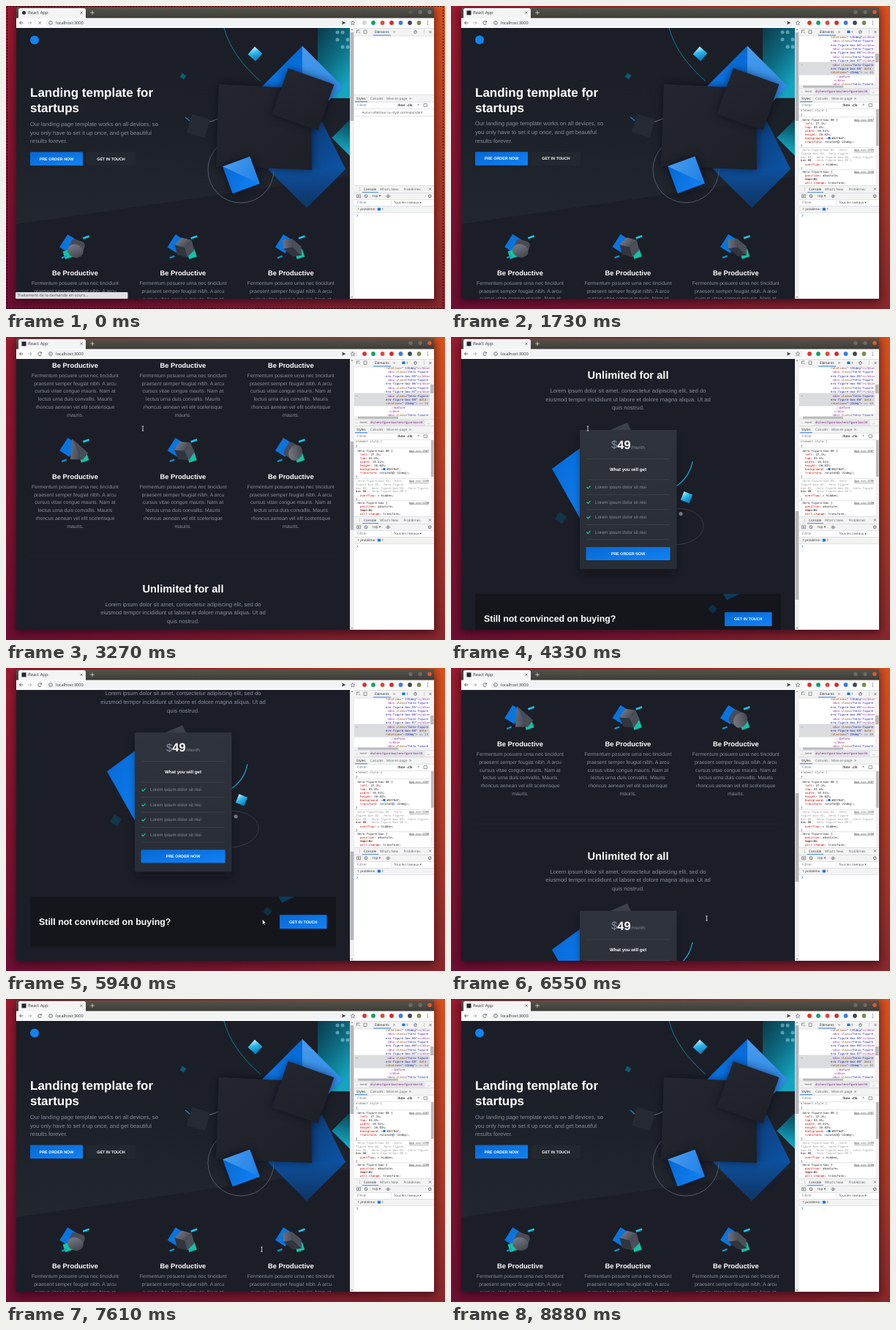
Write an HTML page that moves like this. It is 600 px wide and 414 px high and loops after 9.06 s.

```html
<!DOCTYPE html>
<html lang="fr">
<head>
<meta charset="utf-8">
<title>React App</title>
<style>
html, body { margin: 0; width: 100%; height: 100%; overflow: hidden; background: #620d3c; }
svg { display: block; width: 600px; height: 414px; }
text { white-space: pre; text-rendering: geometricPrecision; }
.site { font-family: "Liberation Sans", Arial, sans-serif; }
.ui { font-family: "Open Sans", "Noto Sans", sans-serif; }
.code { font-family: "DejaVu Sans Mono", monospace; }
.b { font-weight: 700; }
.m { text-anchor: middle; }
.e { text-anchor: end; }
</style>
</head>
<body>
<svg id="stage" viewBox="0 0 600 414"></svg>
<script>
const LOOP = 9060, LOADED = 900;
const esc = s => s.replace(/&/g, '&amp;').replace(/</g, '&lt;');
const repeat = (n, draw) => Array.from({ length: n }, (_, i) => draw(i)).join('');
// y is the optical middle of the line
const text = (x, y, size, str, fill, cls = 'ui') =>
  `<text x="${x}" y="${y + size * .35}" font-size="${size}" fill="${fill}" class="${cls}">${esc(str)}</text>`;
const lines = (x, y, step, size, rows, fill, cls) => repeat(rows.length, i => text(x, y + i * step, size, rows[i], fill, cls));
const rect = (x, y, w, h, fill, more = '') =>
  `<rect x="${x}" y="${y}" width="${w}" height="${h}" fill="${fill}" ${more}/>`;
const poly = (points, fill, more = '') => `<polygon points="${points}" fill="${fill}" ${more}/>`;
const circle = (x, y, r, fill, more = '') => `<circle cx="${x}" cy="${y}" r="${r}" fill="${fill}" ${more}/>`;
const line = (d, stroke, width = .8) => `<path d="${d}" fill="none" stroke="${stroke}" stroke-width="${width}"/>`;
const ring = (x, y, r, stroke, width = .7) => circle(x, y, r, 'none', `stroke="${stroke}" stroke-width="${width}"`);
const place = (x, y, angle, body) => `<g transform="translate(${x} ${y}) rotate(${angle})">${body}</g>`;
const square = (x, y, size, angle, fill, ratio = 1) =>
  place(x, y, angle, rect(-size / 2, -size * ratio / 2, size, size * ratio, fill));
const sheen = (x, y, size, angle) =>
  place(x, y, angle, `<path d="M${-size / 2} ${-size / 2}h${size}v${size}z" fill="url(#sheen)" opacity=".75"/>`);
const shadow = body => `<g filter="url(#soft)" opacity=".55">${body}</g>`;
const group = (id, body, more = '') => `<g id="${id}" ${more}>${body}</g>`;
const grad = (id, [x2, y2], ...colors) =>
  `<linearGradient id="${id}" x1="0" y1="0" x2="${x2}" y2="${y2}">` +
  colors.map((c, i) => `<stop offset="${i / (colors.length - 1)}" stop-color="${c}"/>`).join('') + '</linearGradient>';
const clip = (id, x, y, w, h) => `<clipPath id="${id}">${rect(x, y, w, h, '#000')}</clipPath>`;

const defs = '<defs>' +
  grad('wall', [1, 0], '#9c1a30', '#b9302a', '#dc5220') +
  grad('dusk', [0, 1], '#4a063600', '#4a063690') +
  grad('frame', [0, 1], '#55534b', '#3d3c37') +
  grad('slope', [0, 1], '#1b1e26', '#1c2028', '#22262e') +
  grad('blue', [1, 1], '#0568d4', '#1282f5') +
  grad('deep', [1, 1], '#0c5fc0', '#0d4f9c', '#0f3564') +
  grad('flank', [1, 1], '#0d3c78', '#0b55a8') +
  grad('sheen', [1, 1], '#62acf2', '#1c7fe6') +
  grad('teal', [.6, 1], '#0b3a4a', '#0c6a80', '#15a5c0') +
  grad('ice', [1, .6], '#c9f3ff', '#2bb6ea', '#0b86c6') +
  grad('slab', [1, 1], '#23262e', '#1d2027') +
  grad('steel', [1, 1], '#80838c', '#3a3d46') +
  grad('card', [0, 1], '#2f333c', '#282c34') +
  '<filter id="soft" x="-30%" y="-30%" width="160%" height="160%"><feGaussianBlur stdDeviation="6"/></filter>' +
  clip('page', 14, 30, 456, 370) + clip('tree', 476, 41, 103, 68) + clip('rules', 476, 140, 103, 104.5) +
  '</defs>';

/* landing page, laid out at scroll 0 */
const WHITE = '#fff', MUTED = '#858d9a', BLACK = '#0c0e13';
const button = (x, y, w, h, label, fill = 'url(#blue)') =>
  rect(x, y, w, h, fill, 'rx=".8"') + text(x + w / 2, y + h / 2, 5.4, label, WHITE, 'site b m');

function hero() {
  const slab = fill => poly('291,107 417,113 418,224 287,219', fill);
  const block = fill => square(406, 127.5, 66.5, 19.5, fill);
  const box = fill => square(321.5, 231, 39.5, -20, fill);
  return poly('14,30 470,30 470,232 14,298', 'url(#slope)') +
    circle(39, 46.5, 6, '#0f84f2') +
    line('M298 30Q308 68 348 103', '#0c7f9c', 1) +
    rect(426, 30, 44, 96, 'url(#teal)') +
    repeat(6, i => circle(453 + i % 3 * 7, 36 + (i >> 1) * 10, 2.5, '#bfeaf2', 'opacity=".45"')) +
    square(475, 180, 42, 45, 'url(#teal)') +
    square(405, 110, 78, 45, 'url(#blue)') + sheen(405, 110, 78, 45) +
    square(411, 223, 75, 45, 'url(#deep)') + poly('417,165 432,158 464,223 417,223', 'url(#flank)') +
    ring(321, 224, 45, '#646a76', .8) +
    line('M245 152Q249 155 251 157', '#1689d8', 1.2) + line('M276 159Q284 157 292 153', '#747a85', 1) +
    square(263, 164, 26, 17, '#262a32') + square(242, 96, 6.5, 35, '#0e5a72') +
    shadow(slab(BLACK)) + slab('url(#slab)') + shadow(block(BLACK)) + block('url(#slab)') +
    square(340.5, 65.5, 14, 42, 'url(#ice)') +
    shadow(box(BLACK)) + box('url(#blue)') + sheen(321.5, 231, 39.5, -20) +
    lines(33, 118, 21, 17, ['Landing template for', 'startups'], WHITE, 'site b') +
    lines(33, 161, 11.8, 7.74, ['Our landing page template works on all devices, so',
      'you only have to set it up once, and get beautiful', 'results forever.'], MUTED, 'site') +
    button(33, 199.5, 72, 18.5, 'PRE ORDER NOW') + button(110, 199.5, 67, 18.5, 'GET IN TOUCH', '#23272f');
}

const hexPoint = (k, r) => [Math.sin(k * Math.PI / 3) * r, -Math.cos(k * Math.PI / 3) * r].map(v => v.toFixed(1)).join();
const cube = r => ['url(#steel)', '#4b4f59', '#32353e'].map((fill, i) =>
  poly(['0,0', ...[5, 6, 7].map(k => hexPoint(k + i * 2, r))].join(' '), fill)).join('');
const solids = {
  cylinder: rect(-10, -10, 20, 17, '#484c56', 'rx="5"') + `<ellipse cy="5" rx="11" ry="9" fill="url(#steel)"/>`,
  cube: cube(14),
  prism: `<g transform="scale(.75 1.2)">${cube(14)}</g>`,
  cone: poly('0,-18 -12,8 4,14', 'url(#steel)') + poly('0,-18 4,14 14,8', '#484c56')
};
const icon = (kind, turn) => square(-9, -5, 16, 32, '#0a74de', 1.3) + square(turn < 0 ? 12 : -10, 9, 11, -18, '#12c3a4') +
  square(15, -14, 9, -20, '#18c8ec', .3) + square(-15, 13, 7, -20, '#0c9fd0', .3) + place(2, 0, turn, solids[kind]);
const tiles = [['cylinder', 20], ['cube', -15], ['prism', -50], ['cone', -20], ['cube', -25], ['cylinder', -60]];
const blurb = ['Fermentum posuere urna nec tincidunt', 'praesent semper feugiat nibh. A arcu', 'cursus vitae congue mauris. Nam at',
  'lectus urna duis convallis. Mauris', 'rhoncus aenean vel elit scelerisque', 'mauris.'];
const features = () => tiles.map((tile, i) =>
  place(94.5 + i % 3 * 147.4, 330 + (i > 2) * 152, 0, icon(...tile) +
    text(0, 35, 9.35, 'Be Productive', WHITE, 'site b m') + lines(0, 48.7, 10.8, 6.93, blurb, MUTED, 'site m'))).join('');

function pricing() {
  const rule = y => rect(185, y, 114, .6, '#454a54');
  const item = i => {
    const y = 823 + i * 20.5;
    return line(`M185.5 ${y}l1.8 1.8 3.2-3.4`, '#10cfa8', 1.2) +
      text(197, y, 6.17, 'Lorem ipsum dolor sit nisi', MUTED, 'site') + rule(y + 10);
  };
  return rect(33, 626, 418, .5, '#262a32') +
    text(242, 670, 14.7, 'Unlimited for all', WHITE, 'site b m') +
    lines(242, 691.3, 11.7, 7.72, ['Lorem ipsum dolor sit amet, consectetur adipiscing elit, sed do',
      'eiusmod tempor incididunt ut labore et dolore magna aliqua. Ut ad', 'quis nostrud.'], MUTED, 'site m') +
    square(150, 865, 12, 35, '#123646') +
    poly('138,798 190,760 190,890', 'url(#blue)') + poly('190,757 241,735 252,757', '#3d424c') +
    line('M330 788Q326 810 306 823', '#1ba8d8', 1.2) + square(322, 837, 12.5, 22, 'url(#ice)') +
    line('M306 852C358 852 358 899 306 902', '#3f444e') + circle(314, 859.5, 2.6, '#767c87') +
    shadow(rect(178, 752, 128, 190, BLACK)) + rect(176, 745, 132.5, 190, 'url(#card)') +
    text(219, 765, 15, '$', '#8a92a2', 'site') + text(227.3, 765, 16.4, '49', WHITE, 'site b') +
    text(246, 768.5, 6.2, '/month', MUTED, 'site') + rule(784) +
    text(242, 798.5, 6.15, 'What you will get', WHITE, 'site b m') + rule(812.5) +
    repeat(4, item) + button(184.5, 905, 115, 18, 'PRE ORDER NOW') +
    rect(33, 969, 418, 68.5, '#14161c') + poly('372,969 395,969 377,977.5', '#0c3a5c') +
    square(357.5, 989.5, 9, 40, '#0d3046') +
    text(45, 1003, 12.4, 'Still not convinced on buying?', WHITE, 'site b') + button(374, 994, 64.5, 19, 'GET IN TOUCH');
}

/* browser frame */
const INK = '#55585c', HAIR = '#cfd2d6';
const stroke = (d, w = .9) => line(d, INK, w);
const cross = (x, y, r = 1.6) => stroke(`M${x - r} ${y - r}l${2 * r} ${2 * r}m0-${2 * r}l-${2 * r} ${2 * r}`, .7);
const extensions = ['#12a06a', '#e2483c', '#d42a2a', '#3c7de0', '#44474b', '#7a8a55'];
const browser = rect(14, 2, 571, 15, 'url(#frame)', 'rx="2"') + rect(17, 3, 92, 16, '#f4f4f5', 'rx="2.5"') +
  text(30, 9.3, 5.9, 'React App', '#33363a') + cross(103, 9.2) +
  line('M118 6.3v5.6m-2.8-2.8h5.6', '#d8d7d3') +
  rect(14, 16.5, 571, 13.5, '#fdfdfd') + rect(54, 17.8, 427, 10.8, '#f1f3f4', 'rx="5.4"') +
  stroke('M23.5 23h-5m2.3-2.3l-2.3 2.3 2.3 2.3') + line('M30 23h5m-2.3-2.3l2.3 2.3-2.3 2.3', '#a5a8ab') +
  ring(61, 23, 2.4, INK) + stroke('M61 22.6v1.6m0-2.7v.5', .6) +
  text(68, 23, 5.6, 'localhost:3000', '#303236') +
  poly('459,20.5 464.5,23 459,25.5 460,23', '#3d4044') +
  stroke('M474 20.2l.9 1.9 2 .2-1.5 1.4.4 2-1.8-1-1.8 1 .4-2-1.5-1.4 2-.2z', .6) +
  repeat(extensions.length, i => circle(502 + i * 12.5, 23, 2.9, extensions[i])) +
  repeat(3, i => circle(576.5, 20.8 + i * 2.2, .6, INK));

/* developer tools */
const gear = (x, y) => circle(x, y, 1.7, 'none', 'stroke="#4c4f53" stroke-width="1.1" stroke-dasharray="1 .35"');
const tab = (x, y, s, width) => text(x, y, 4.6, s, width ? '#222' : '#606468') +
  (width ? rect(x - 2, y + 4, width, .9, '#1a73e8') : '');
const badge = (x, y) => rect(x - 2.2, y - 2, 4.2, 3.6, '#1a73e8', 'rx=".6"') + text(x + 3.5, y, 4.6, '1', '#333');
const hr = y => rect(476, y, 109, .6, HAIR);
const bar = (y, h) => rect(476, y, 109, h, '#f3f3f3') + hr(y) + hr(y + h);
const tools = rect(476, 30, 109, 370, '#fff') +
  bar(30, 10.7) + stroke('M479.5 37v-4h4m-2 2l2.4 2.4', .7) + stroke('M489 33h4v4.5h-4z', .6) +
  tab(504, 35.5, 'Éléments', 24) + text(529, 35, 6, '»', INK) + gear(559.5, 35.5) + text(568.5, 35.3, 6, '⋮', INK) + cross(580, 35.5) +
  bar(121.3, 9.7) + tab(479, 126.3, 'Styles', 17) + tab(498, 126.3, 'Calculés') + tab(520, 126.3, 'Mise en page') + text(551, 126, 6, '»', INK) +
  text(480, 135.4, 4.8, 'Filtrer', '#777') + text(535, 135.4, 4.8, ':hov  .cls', '#333', 'ui b') +
  text(562, 135.2, 6, '+', INK) + stroke('M571 133.6h4.5v4h-4.5z', .6) + hr(140) +
  bar(245, 10) + text(480.5, 250, 6, '⋮', INK) + tab(489, 250.3, 'Console', 22) +
  tab(511, 250.3, "What's New") + tab(543.5, 250.3, 'Problèmes') + cross(579.5, 250) +
  bar(255, 9.5) + stroke('M479.5 257.8h5v4h-5zm2 1l1.4 1-1.4 1z', .6) + ring(492, 259.7, 2, INK) + stroke('M490.6 258.3l2.8 2.8', .6) +
  text(501, 259.8, 4.8, 'top ▾', '#444') + stroke('M519.5 259.8q2.7-3.6 5.4 0q-2.7 3.6-5.4 0z', .7) + circle(522.2, 259.8, .9, INK) +
  gear(579.3, 259.7) + text(480, 268.7, 4.8, 'Filtrer', '#777') + rect(526, 265.5, .5, 7, HAIR) +
  text(530, 268.7, 4.5, 'Tous les niveaux ▾', '#444') +
  bar(273, 9) + text(480.5, 277.7, 4.4, '1 problème :', '#333') + badge(510, 277.8) +
  line('M479.3 284.6l1.5 1.6-1.5 1.6', '#2b78e4', .8);

const code = (x, y, ...parts) => `<text x="${x}" y="${y + 1.4}" font-size="4" class="code">` +
  parts.map(([s, c]) => `<tspan fill="${c}">${esc(s)}</tspan>`).join('') + '</text>';
const TAG = '#881280', VAL = '#1a1aa6', ATT = '#994500', RED = '#c80000', DARK = '#222', PALE = '#999';
function tree() {
  const open = [[' <div ', TAG], ['class', ATT], ['="hero-figure-box h', VAL]];
  const rotation = (deg, ...rest) => [['rotation', ATT], [`="${deg}deg"`, VAL], ...rest];
  const sibling = n => [open, [[`ero-figure-box-${n}"`, VAL], ['></div>', TAG]]];
  const rows = [rotation(-135, ['></div>', TAG]), ...['05', '06', '07'].flatMap(sibling),
    open, [['ero-figure-box-08" ', VAL], ['data-', ATT]], rotation(-22, ['> == $0', '#777']),
    [['   ::before', TAG]], [['  </div>', TAG]], open];
  return rect(476, 76.5, 103, 18, '#dadce0') + text(477.5, 79, 5, '…', INK) +
    rows.map((row, i) => code(519, 42.5 + i * 5.38, ...row)).join('');
}
function rules() {
  const prop = (y, name, value) => code(484, y, [name, RED], [': ' + value + ';', DARK]);
  const head = (y, s, n) => code(478, y, [s, DARK]) +
    `<text x="578" y="${y + 1.2}" font-size="3.75" class="code e" fill="#333" text-decoration="underline">App.css:${n}</text>`;
  const box = ['left: 27.1%', 'top: 81.6%', 'width: 19.51%', 'height: 26.02%', 'background: ▸  #0270d7', 'transform: rotateZ( -22deg)'];
  const shared = ['.hero-figure-box-01, .hero-', 'figure-box-02, .hero-figure-', 'box-03, .hero-figure-box-04, .hero-figure-'];
  return code(478, 143, ['element.style {', '#666']) + code(478, 148.5, ['}', DARK]) + hr(151.5) +
    head(155.5, '.hero-figure-box-08 {', 1387) + repeat(box.length, i => prop(160.7 + i * 5, ...box[i].split(': '))) +
    rect(515.5, 179, 3, 3, '#0270d7') + ring(529.5, 185.7, 1.4, INK) + code(478, 190.5, ['}', DARK]) + hr(193) +
    head(197, '', 1195) + repeat(3, i => code(478, 197 + i * 4.6, [shared[i], PALE])) +
    code(478, 211, ['box-08', DARK], [', .hero-figure-box-09 {', PALE]) +
    prop(216.5, 'overflow', '▸ hidden') + code(478, 221.5, ['}', DARK]) + hr(223.5) + head(226.5, '.hero-figure-box {', 1190) +
    prop(231.5, 'position', 'absolute') + prop(236.5, 'top', '0') + line('M484 236.5h17', '#333', .5) + prop(241.5, 'will-change', 'transform');
}

const controls = (...fills) => repeat(3, i => circle(553 + i * 13, 8.2, 2.7, fills[i]));
const busy = cross(46.3, 23, 2.1) + circle(24.5, 9.3, 2.5, '#2a2c30') + circle(490, 23, 2.9, '#d3d6d8') +
  controls('#5b5953', '#6b6a65', '#77756f') +
  text(528, 145, 4.5, 'Aucun sélecteur ou style correspondant', '#555', 'ui m') + hr(150) +
  rect(13, 391, 153.5, 9, '#dee0e2', 'rx="1"') + text(15.5, 395.2, 5.6, 'Traitement de la demande en cours…', '#5b5e62');
const ready = stroke('M48.2 21.6a2.4 2.4 0 1 0 .3 2.2m0-3.4v1.7h-1.8') +
  rect(21.5, 6.3, 6, 6, '#23272f') + circle(490, 23, 2.9, '#d9362b') +
  controls('#6d6b64', '#6d6b64', '#e8582b') + badge(543.5, 35.5) +
  group('treePane', tree(), 'clip-path="url(#tree)"') + rect(579.5, 41, 5.5, 68, '#f1f1f1') + rect(580, 65, 4.5, 12, '#b9bbbd') +
  rect(476, 108, 109, 4.5, '#f1f1f1') + rect(481, 108.7, 55, 3, '#b9bbbd') + bar(112.5, 9) +
  text(478, 117, 4.2, '…  ment', '#555') + rect(496.5, 113, 76, 8, '#e2e4e7') +
  text(498, 117, 4, 'div.hero-figure-box.hero-figure-box-08', TAG) + text(576, 117, 4.4, '…', '#555') +
  group('rulePane', rules(), 'clip-path="url(#rules)"') + rect(580.5, 140.5, 4.5, 104, '#f1f1f1') + rect(581, 141, 3.5, 50, '#b9bbbd');

const PAGE = 1095, VIEW = 370, TRACK = 358, THUMB = TRACK * VIEW / PAGE;
document.getElementById('stage').innerHTML = defs +
  rect(0, 0, 600, 414, 'url(#wall)') + rect(0, 0, 600, 414, 'url(#dusk)') + shadow(rect(12, 3, 575, 402, '#14040c')) +
  group('view', rect(14, 30, 456, 370, '#1b1e27') + group('content', hero() + features() + pricing()), 'clip-path="url(#page)"') +
  browser + rect(470, 30, 6, 370, '#f1f1f1') + poly('471.5,33 474.5,33 473,31.3', '#888') + poly('471.5,397 474.5,397 473,398.8', '#888') +
  rect(470.7, 36, 4.6, THUMB, '#b4b6b9', 'id="thumb"') + tools + group('busy', busy) + group('ready', ready) +
  rect(1.5, .5, 596, 413, 'none', 'id="marquee" stroke="#120610" stroke-dasharray="2 2"') +
  group('beam', line('M-1.3-3h2.6M0-3v6M-1.3 3h2.6', '#e4e6ea', .8)) +
  group('arrow', '<path d="M0-3.5v7l1.6-1.4 1.1 2.3 1-.5-1.1-2.2h2.1z" fill="#fff" stroke="#111" stroke-width=".5"/>');

/* motion: [time, ...values] */
const scrollSteps = [[1730, 0], [2450, 179], [3270, 326], [4720, 725], [5770, 725], [7586, 0]];
const pointerSteps = [[1000, 46, 23], [1390, 187, 125], [4750, 187, 125], [5700, 351, 349], [6500, 349.5, 342], [7700, 349.5, 342], [8550, 46, 23]];
function at(steps, t) {
  const next = steps.findIndex(s => s[0] > t);
  if (next < 1) return steps.at(next).slice(1);
  const [t0, ...from] = steps[next - 1], [t1, ...to] = steps[next];
  return from.map((v, i) => v + (to[i] - v) * (t - t0) / (t1 - t0));
}

const part = Object.fromEntries(['content', 'thumb', 'busy', 'ready', 'marquee', 'beam', 'arrow'].map(id => [id, document.getElementById(id)]));
const show = (el, on) => el.setAttribute('visibility', on ? 'visible' : 'hidden');
const move = (el, x, y) => el.setAttribute('transform', `translate(${x} ${y})`);

function draw(t) {
  const [scroll] = at(scrollSteps, t), [x, y] = at(pointerSteps, t);
  move(part.content, 0, -scroll);
  move(part.thumb, 0, scroll / (PAGE - VIEW) * (TRACK - THUMB));
  show(part.busy, t < LOADED);
  show(part.ready, t >= LOADED);
  show(part.marquee, t < 60);
  const present = t > 1000 && t < 8500;
  const overText = (t > 1300 && t < 4800) || (t > 6300 && t < 7800);
  show(part.beam, present && overText);
  show(part.arrow, present && !overText);
  move(part.beam, x, y);
  move(part.arrow, x, y);
}

const start = performance.now();
function tick() {
  draw((performance.now() - start) % LOOP);
  requestAnimationFrame(tick);
}
tick();
</script>
</body>
</html>
```
